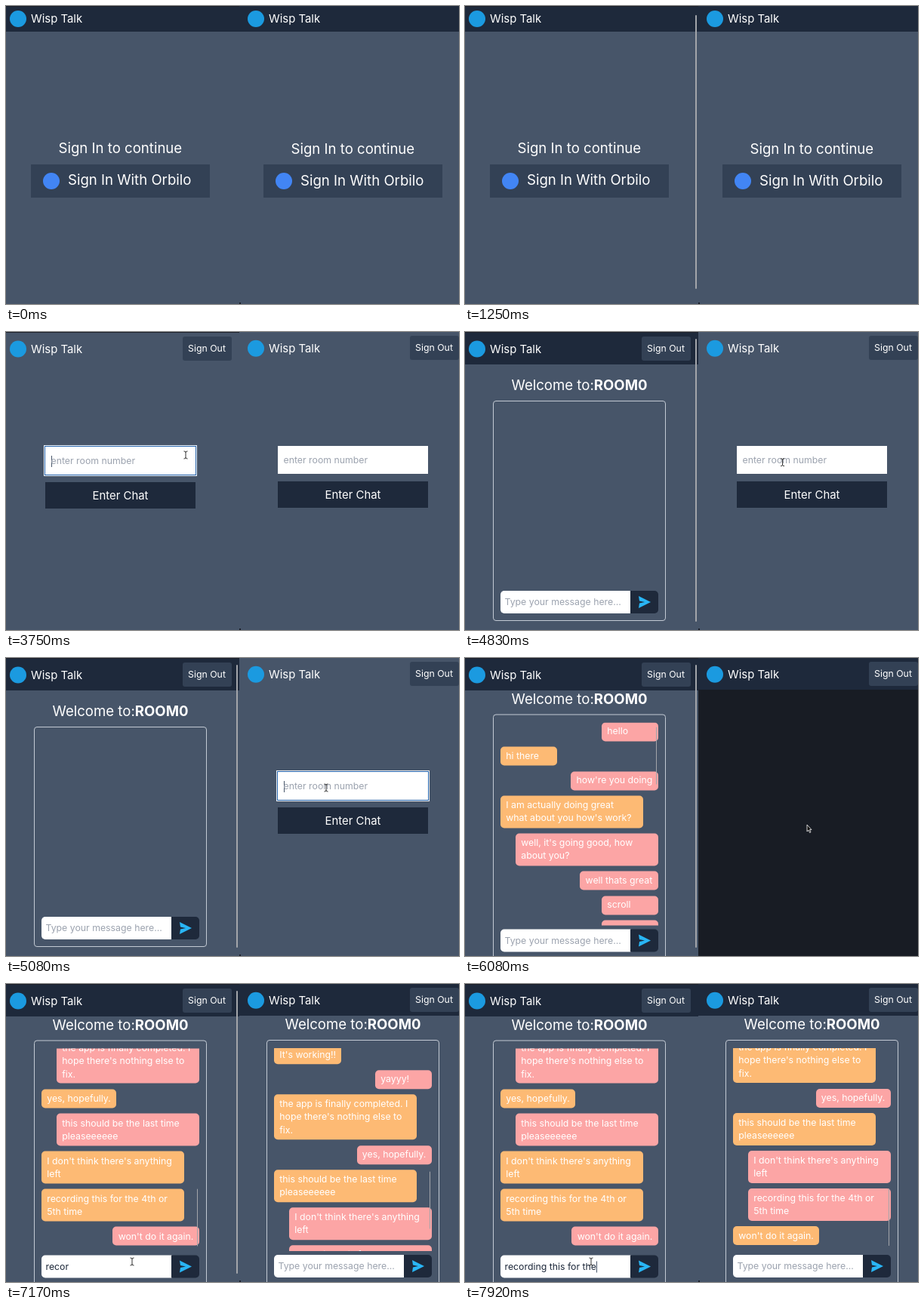
Write an HTML page that moves like this. It is 600 px wide and 395 px high and loops after 8000 ms.

```html
<!DOCTYPE html>
<html lang="en">
<head>
<meta charset="utf-8">
<title>Two-pane chat</title>
<style>
  html, body { margin: 0; width: 100%; height: 100%; overflow: hidden; background: #475569; }
  #stage { position: relative; width: 600px; height: 395px; overflow: hidden; background: #475569;
    font: 12.3px/20px Inter, sans-serif; color: #fff; }
  #stage div { position: absolute; white-space: pre; box-sizing: border-box; }
  .pane { top: 0; height: 395px; overflow: hidden; }
  .full { inset: 0; }
  .mid { font-size: 14.9px; }
  .big { font-size: 18.6px; }
  .center { text-align: center; }
  .dark { background: #1e293b; }
  .button { background: #334155; }
  .dot { border-radius: 50%; }
  .field { background: #fff; color: #1e293b; overflow: hidden; }
  .field i { display: inline-block; width: 1px; height: 15px; margin-right: -1px;
    vertical-align: middle; background: #475569; }
  .field em { font-style: normal; color: #9ca3af; }
  .focus { box-shadow: 0 0 0 1px #2563ab, 0 0 0 2px #f1f5f9; }
  .panel { border: 1px solid #c3cad4; border-radius: 4px; }
  .list { overflow: hidden; }
  #stage .items { position: relative; display: flex; flex-direction: column; gap: 7.5px; }
  #stage .bubble { position: static; min-width: 74.5px; padding: 3.75px 7.25px; border-radius: 5px;
    line-height: 17.5px; background: #fdba74; align-self: flex-start; }
  #stage .own { background: #fca5a5; align-self: flex-end; }
  .thumb { background: #a3a5aa; border-radius: 1px; }
  svg { position: absolute; overflow: visible; }
</style>
</head>
<body>
<div id="stage"></div>
<script>
const LOOP = 8000;
const stage = document.getElementById('stage');

// [sent from the left pane, text]
const messages = [
  [1, 'hello'],
  [0, 'hi there'],
  [1, "how're you doing"],
  [0, 'I am actually doing great\nwhat about you how\'s work?'],
  [1, "well, it's going good, how\nabout you?"],
  [1, 'well thats great'],
  ...Array(9).fill([1, 'scroll']),
  [1, "It's working!!"],
  [0, 'yayyy!'],
  [1, "the app is finally completed. I\nhope there's nothing else to\nfix."],
  [0, 'yes, hopefully.'],
  [1, 'this should be the last time\npleaseeeeee'],
  [0, "I don't think there's anything\nleft"],
  [0, 'recording this for the 4th or\n5th time'],
  [1, "won't do it again."]
];
const LIST_HEIGHT = 269;
const lineCount = messages.reduce((n, m) => n + m[1].split('\n').length, 0);
const maxScroll = messages.length * 15 + lineCount * 17.5 - LIST_HEIGHT;

const clamp = v => Math.min(1, Math.max(0, v));
const progress = (t, from, to) => clamp((t - from) / (to - from));
const ease = p => p < .5 ? 4 * p ** 3 : 1 - 4 * (1 - p) ** 3;
const show = (node, on) => { node.style.display = on ? '' : 'none'; };
const typed = (text, t, start, step) => text.slice(0, Math.max(0, Math.floor((t - start) / step)));

function box(parent, cls, x, y, w, h, text = '') {
  const node = document.createElement('div');
  node.className = cls;
  Object.assign(node.style, { left: x + 'px', top: y + 'px', width: w + 'px', height: h + 'px' });
  node.textContent = text;
  parent.append(node);
  return node;
}

// A line of text whose capitals are centred on y
const label = (parent, cls, x, y, text, w = 240) => box(parent, cls, x, y - 10, w, 20, text);

function layer(parent) {
  const node = document.createElement('div');
  node.className = 'full';
  parent.append(node);
  return node;
}

function svg(parent, x, y, body) {
  parent.insertAdjacentHTML('beforeend',
    `<svg width="20" height="20" style="left:${x}px;top:${y}px">${body}</svg>`);
  return parent.lastElementChild;
}

function field(parent, x, y, w, h, pad, hint) {
  const node = box(parent, 'field', x, y, w, h);
  node.style.padding = `0 0 0 ${pad}px`;
  node.style.lineHeight = h + 'px';
  node.innerHTML = '<span></span><i></i><em></em>';
  const [text, caret, placeholder] = node.children;
  placeholder.textContent = hint;
  return {
    node,
    set(value, focused, blink) {
      text.textContent = value;
      show(caret, focused && blink);
      show(placeholder, !value);
    }
  };
}

function buildPane(left, width, c) {
  const root = box(stage, 'pane', left, 0, width, 395);
  const x = c.x;

  const login = layer(root);
  label(login, 'big', x + 69.5, 187.8 + c.loginY, 'Sign In to continue');
  box(login, 'button', x + 33, 209.5 + c.loginY, 236.5, 44);
  box(login, 'dot', x + 49, 220.5 + c.loginY, 22, 22).style.background = '#4285f4';
  label(login, 'big', x + 82, 230.2 + c.loginY, 'Sign In With Orbilo');

  const lobby = layer(root);
  const room = field(lobby, x + 52, 152 + c.lobbyY, 199, 37, 7.5, 'enter room number');
  box(lobby, 'dark', x + 52, 199 + c.lobbyY, 199, 35);
  label(lobby, 'mid center', x + 52, 217 + c.lobbyY, 'Enter Chat', 199);

  const chat = layer(root);
  label(chat, 'big', x + 61.5, 69.5, '').innerHTML = 'Welcome to:<b>ROOM0</b>';
  const panel = box(chat, 'panel', x + 36.5, 91, 229.5, 292);
  const list = box(chat, 'list', x + 47, 101.5, 208.5, LIST_HEIGHT);
  const items = box(list, 'items', 0, 0, 208.5, 0);
  for (const [fromLeft, text] of messages) {
    const bubble = document.createElement('div');
    bubble.className = 'bubble' + (fromLeft == c.isLeft ? ' own' : '');
    bubble.textContent = text;
    if (text.includes('\n')) bubble.style.width = '188.5px';
    items.append(bubble);
  }
  const thumb = box(list, 'thumb', 205.5, 0, 1.5, 76);
  const form = box(chat, '', x + 47, 343, 208.5, 30);
  const entry = field(form, 0, 0, 173, 30, 5.5, 'Type your message here...');
  entry.node.style.borderRadius = '5px 0 0 5px';
  box(form, 'dark', 172, 0, 36.5, 30).style.borderRadius = '0 5px 5px 0';
  svg(form, 182, 7, '<path fill="#29b6f6" d="M1 0L17 8L1 16L2 9.5L9 8L2 6.5Z"/>');

  const header = box(root, '', 0, 0, width, 33);
  const brand = layer(header);
  box(brand, 'dot', c.headX + 5, 5.5, 22, 22).style.background = '#1b9ae0';
  label(brand, 'mid', c.headX + 33, 16.5, c.name);
  const signOut = box(header, 'button center', c.outX, 6 + c.lobbyY, 65, 32, 'Sign Out');
  signOut.style.lineHeight = '32px';
  signOut.style.borderRadius = '3px';

  return function render(t, blink) {
    const signedIn = t >= c.signIn;
    const entered = t >= c.enter;
    const ready = t >= c.ready;
    const loaded = t >= c.load;
    show(login, !signedIn);
    show(lobby, signedIn && !entered);
    show(chat, ready);
    show(signOut, signedIn);
    root.style.background = entered && !ready ? '#181c24' : '#475569';

    header.style.height = (signedIn ? 43 + c.lobbyY : 33.5) + 'px';
    header.style.background = signedIn && !entered ? '#475569' : '#1e293b';
    brand.style.transform = `translateY(${signedIn ? 5.5 + c.lobbyY * .7 : 0}px)`;

    const focused = t >= c.focus && !entered;
    room.node.classList.toggle('focus', focused);
    room.set(typed('room0', t, c.type, 75), focused, blink);

    // The page settles first, then the list runs down to the newest message
    const pageY = 16.5 * ease(progress(t, c.load, c.load + 110));
    chat.style.transform = `translateY(${c.chatY - pageY}px)`;
    panel.style.height = (loaded ? 325 : 292) + 'px';
    form.style.top = (loaded ? 375.5 : 343) + 'px';
    show(list, loaded);
    const p = ease(progress(t, c.load + 120, c.load + 450));
    items.style.transform = `translateY(${-p * maxScroll}px)`;
    thumb.style.transform = `translateY(${6 + p * 180}px)`;
    show(thumb, t < c.thumbEnd);

    const text = c.isLeft ? typed('recording this for the', t, 6945, 44.1) : '';
    entry.set(text, c.isLeft && t > 6850, blink);
  };
}

const name = 'Wisp Talk';
const panes = [
  buildPane(0, 309, {
    name, isLeft: 1, x: 0, headX: 0, outX: 233.5, loginY: 0, lobbyY: 0, chatY: 0,
    signIn: 3490, focus: 3660, type: 3760, enter: 4330, ready: 4580, load: 5950, thumbEnd: 7600
  }),
  buildPane(309, 291, {
    name, isLeft: 0, x: -1, headX: 6, outX: 225.5, loginY: .7, lobbyY: -1, chatY: -.5,
    signIn: 2490, focus: 4920, type: 5100, enter: 5830, ready: 6170, load: 6825, thumbEnd: LOOP
  })
];

box(stage, '', 0, 0, 309, 1).style.background = '#1b1f29';
box(stage, '', 309, 393, 2, 2).style.background = '#1b1f29';
const pageThumb = box(stage, 'thumb', 305, 0, 2, 0);

const beam = svg(stage, 0, 0,
  '<path d="M-2.5-5Q0-5 0-3.5Q0-5 2.5-5M0-4V4M-2.5 5Q0 5 0 3.5Q0 5 2.5 5" fill="none" stroke="#333" stroke-width="1"/>');
const arrow = svg(stage, 0, 0,
  '<path d="M0 0V9L2 7.2L3.6 10.5L5 9.8L3.5 6.6H6Z" fill="#111" stroke="#fff" stroke-width=".8"/>');

// time, x, y
const pointerPath = [
  [3490, 200, 232], [3700, 238, 163], [3900, 238, 163], [4200, 185, 220], [4450, 185, 220],
  [4900, 424, 172], [5350, 424, 172], [5650, 453, 221], [6250, 453, 221], [6800, 167, 368], [LOOP, 167, 368]
];

function drawPointer(t) {
  const i = pointerPath.findIndex(k => k[0] > t);
  const visible = i > 0;
  let overText = false;
  if (visible) {
    const [a, b] = [pointerPath[i - 1], pointerPath[i]];
    const p = ease(progress(t, a[0], b[0]));
    const x = a[1] + (b[1] - a[1]) * p;
    const y = a[2] + (b[2] - a[2]) * p;
    overText = (y > 152 && y < 189) || y > 355;
    beam.style.transform = arrow.style.transform = `translate(${x}px, ${y}px)`;
  }
  show(beam, visible && overText);
  show(arrow, visible && !overText);
}

function frame() {
  const t = performance.now() % LOOP;
  const blink = (t + 500) % 1000 < 600;
  panes.forEach(render => render(t, blink));
  const inRoom = t > 4500;
  show(pageThumb, (t > 400 && t < 2900) || (inRoom && t < 7580));
  pageThumb.style.top = (inRoom ? 8.5 : 12) + 'px';
  pageThumb.style.height = (inRoom ? 375 : 363) + 'px';
  drawPointer(t);
  requestAnimationFrame(frame);
}
frame();
</script>
</body>
</html>
```
